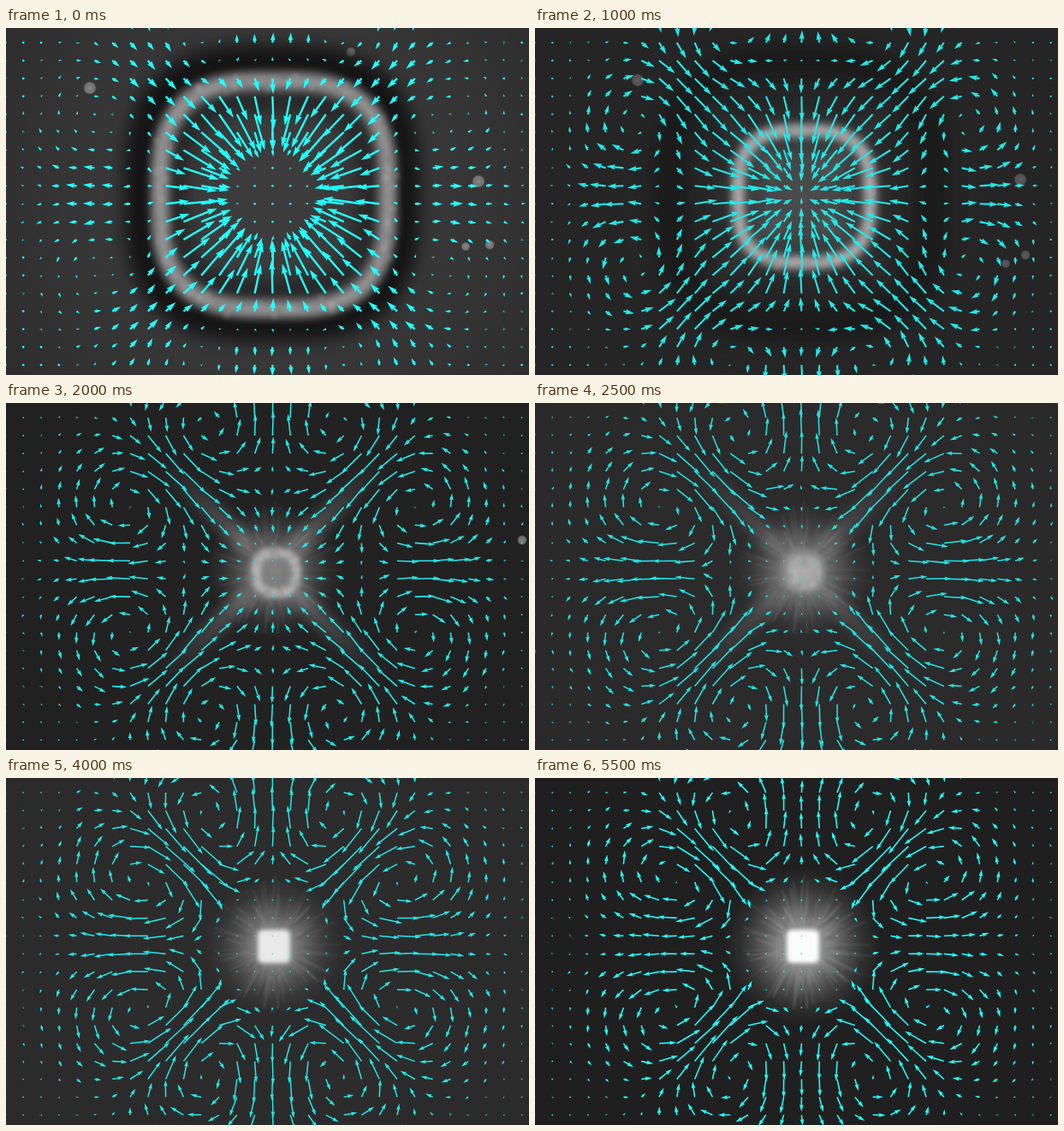
Write an HTML page with a canvas that moves like this. It is 611 px wide and 405 px high and loops after 6 s.

```html
<!DOCTYPE html>
<html lang="en">
<head>
<meta charset="utf-8">
<title>Contracting ring with flow field</title>
<style>
  html, body { margin: 0; width: 100%; height: 100%; overflow: hidden; background: #222; }
  canvas { display: block; width: 611px; height: 405px; }
</style>
</head>
<body>
<canvas id="stage" width="611" height="405"></canvas>
<script>
const W = 611, H = 405, CX = 311, CY = 195;
const STEP = 500, STEPS = 12;
const ctx = document.getElementById('stage').getContext('2d');

// Flow and image settings at a few steps; the rest is interpolated.
const fields = ['step', 'bg', 'pull', 'pullR', 'pullW', 'swirl', 'swirlR', 'swirlW',
  'jet', 'line', 'ring', 'core', 'halo', 'cyan'];
const keys = [
  [0, 60, 45, 105, 27, 3000, 212, 54, .1, 2.4, 133, 0, 0, 255],
  [2, 38, 36, 90, 45, 5200, 210, 38, .1, 2.1, 77, 0, .24, 232],
  [4, 34, 14, 85, 30, 5800, 185, 47, .1, 1.6, 23, .05, .56, 232],
  [6, 52, 0, 85, 30, 6600, 175, 62, .15, 1.5, 4, .8, .62, 222],
  [8, 44, 0, 85, 30, 6000, 170, 55, .28, 1.5, 0, .95, .62, 232],
  [9, 26, 0, 85, 30, 5100, 170, 55, .35, 1.5, 0, .97, .66, 246],
  [11, 32, 0, 85, 30, 5000, 170, 55, .4, 1.6, 0, 1, .75, 250]
];

// x, y, radius, drift per step, first and last step
const spots = [
  [98, 70, 6, 11, -4.5, 0, 3], [552, 179, 6, 7.5, -1, 0, 3],
  [565, 253, 4, 4, 6, 0, 3], [537, 255, 3.5, 6.5, 10, 0, 3],
  [403, 28, 4, 0, 0, 0, 0], [603, 160, 4, 0, 0, 4, 4]
];

const mix = (a, b, t) => a + (b - a) * t;
const gray = (v, a = 1) => `rgba(${v},${v},${v},${a})`;

function random(seed) {
  let s = seed * 7919 + 17;
  return () => (s = (s * 16807) % 2147483647) / 2147483647;
}

function stateAt(step) {
  let i = 0;
  while (i < keys.length - 2 && keys[i + 1][0] <= step) i++;
  const a = keys[i], b = keys[i + 1];
  const t = (step - a[0]) / (b[0] - a[0]);
  return Object.fromEntries(fields.map((name, n) => [name, mix(a[n], b[n], t)]));
}

function blurred(px, paint) {
  ctx.save();
  ctx.filter = `blur(${px}px)`;
  paint();
  ctx.restore();
}

function radial(x, y, r, stops) {
  const g = ctx.createRadialGradient(x, y, 0, x, y, r);
  stops.forEach(([at, color]) => g.addColorStop(at, color));
  ctx.fillStyle = g;
  ctx.fillRect(x - r, y - r, 2 * r, 2 * r);
}

// Distance to a rounded square at a given angle
const squircle = (r, a) => r * (1.06 - .06 * Math.cos(4 * a));

function strokeSquircle(x, y, r, width, color) {
  ctx.beginPath();
  for (let i = 0; i < 120; i++) {
    const a = i / 120 * Math.PI * 2, d = squircle(r, a);
    ctx.lineTo(x + d * Math.cos(a), y + d * Math.sin(a));
  }
  ctx.closePath();
  ctx.lineWidth = width;
  ctx.strokeStyle = color;
  ctx.stroke();
}

// Dark surroundings that the ring leaves behind while it shrinks
function drawShadow(s) {
  const dark = Math.max(0, (s.ring - 25) / 110);
  if (!dark) return;
  blurred(10, () => strokeSquircle(CX, 193, 154, 38, gray(12, .85 * dark)));
  blurred(9, () => strokeSquircle(CX, 195, 110, 24, gray(24, .6 * dark * dark)));
}

function drawRing(s) {
  if (s.ring < 3) return;
  const t = s.ring / 133;
  const x = mix(316, 313, t), y = mix(199, 195, t);
  const level = 150 + (133 - s.ring) * .5;
  const width = 9 + s.ring * .11;
  const show = Math.min(1, s.ring / 20);
  blurred(4, () => strokeSquircle(x, y, s.ring, width, gray(level * .85, .85 * show)));
  blurred(3, () => strokeSquircle(x, y, s.ring, width * .45, gray(level + 15, .6 * show)));

  // uneven brightness along the ring
  const rnd = random(5);
  blurred(2, () => {
    for (let i = 0; i < 150; i++) {
      const a = rnd() * Math.PI * 2;
      const d = squircle(s.ring, a) + (rnd() - .5) * width * .9;
      ctx.fillStyle = gray(rnd() > .5 ? 205 : 90, .2 * show);
      ctx.beginPath();
      ctx.arc(x + d * Math.cos(a), y + d * Math.sin(a), 1 + rnd() * width * .14, 0, 7);
      ctx.fill();
    }
  });
}

function drawArms(step) {
  const show = Math.max(0, 1 - Math.abs(step - 4) / 3.2);
  if (!show) return;
  blurred(7, () => {
    for (const sx of [-1, 1]) for (const sy of [-1, 1]) {
      const ex = CX + sx * 130, ey = CY + sy * 128;
      const g = ctx.createLinearGradient(CX, CY, ex, ey);
      g.addColorStop(0, gray(190, .55 * show));
      g.addColorStop(.6, gray(150, .26 * show));
      g.addColorStop(1, gray(120, 0));
      ctx.strokeStyle = g;
      ctx.lineWidth = 21;
      ctx.beginPath();
      ctx.moveTo(CX + sx * 26, CY + sy * 26);
      ctx.lineTo(ex, ey);
      ctx.stroke();
    }
  });
}

function drawGlow(s, step) {
  const x = 313, y = 196;
  const size = 80 + Math.max(0, 4 - step) * 28 + Math.max(0, step - 8) * 4;
  radial(x, y, size, [
    [0, gray(200, s.halo)], [.32, gray(190, s.halo * .86)],
    [.55, gray(170, s.halo * .5)], [.78, gray(150, s.halo * .18)], [1, gray(140, 0)]
  ]);
  const rnd = random(11);
  const threads = Math.max(0, s.halo - .3);
  blurred(1.2, () => {
    for (let i = 0; i < 120 && threads; i++) {
      const a = rnd() * Math.PI * 2, r = 24 + rnd() * 14;
      const end = r + 12 + rnd() * 36, bend = a + (rnd() - .5) * .25;
      ctx.strokeStyle = gray(rnd() > .35 ? 200 : 40, threads * .36);
      ctx.lineWidth = .8 + rnd() * 1.4;
      ctx.beginPath();
      ctx.moveTo(x + r * Math.cos(a), y + r * Math.sin(a));
      ctx.lineTo(x + end * Math.cos(bend), y + end * Math.sin(bend));
      ctx.stroke();
    }
  });
  blurred(step < 7 ? 6 : 2.5, () => {
    ctx.fillStyle = gray(mix(205, 252, Math.min(1, step / 11)), s.core);
    ctx.beginPath();
    ctx.roundRect(x - 19, y - 19, 38, 39, 6);
    ctx.fill();
  });
}

function drawSpots(step) {
  for (const [x, y, r, dx, dy, first, last] of spots) {
    if (step < first || step > last) continue;
    const t = step - first, show = 1 - t * .2;
    radial(x + dx * t, y + dy * t, r + 2, [
      [0, gray(165, .75 * show)], [.5, gray(130, .8 * show)],
      [.7, gray(150, .7 * show)], [1, gray(120, 0)]
    ]);
  }
}

// Inward pull plus a pattern of eight vortices, turning less while the pull is strong
function flow(x, y, s) {
  const dx = x - CX, dy = y - CY;
  const r = Math.max(1, Math.hypot(dx, dy)), a = Math.atan2(dy, dx);
  const bell = (d, w) => Math.exp(-d * d / (2 * w * w));
  const flux = q => s.swirl * bell(q - s.swirlR, s.swirlW) * (1 - Math.exp(-((q / 90) ** 6)));
  const out = flux(r) / r * (Math.cos(4 * a) - s.jet * Math.cos(8 * a))
    - s.pull * bell(r - s.pullR, s.pullW);
  const turn = -(flux(r + 1) - flux(r - 1)) / 2 * (1 - s.pull * .012)
    * (Math.sin(4 * a) / 4 - s.jet * Math.sin(8 * a) / 8);
  return [out * Math.cos(a) - turn * Math.sin(a), out * Math.sin(a) + turn * Math.cos(a)];
}

function arrow(x, y, vx, vy, line) {
  const len = Math.min(48, Math.hypot(vx, vy));
  if (len < 1.8) {
    ctx.beginPath();
    ctx.arc(x, y, line * .55, 0, 7);
    ctx.fill();
    return;
  }
  const head = Math.min(line * 5, Math.max(len * .8, 4));
  const half = head * .3, neck = len - head * .9, w = line / 2;
  ctx.save();
  ctx.translate(x, y);
  ctx.rotate(Math.atan2(vy, vx));
  ctx.beginPath();
  ctx.moveTo(0, -w);
  ctx.lineTo(neck, -w);
  ctx.lineTo(len - head, -half);
  ctx.lineTo(len, 0);
  ctx.lineTo(len - head, half);
  ctx.lineTo(neck, w);
  ctx.lineTo(0, w);
  ctx.fill();
  ctx.restore();
}

function drawFlow(s, step) {
  const rnd = random(step + 3);
  ctx.fillStyle = `rgb(34,${s.cyan},${s.cyan})`;
  for (let row = 0; row < 21; row++) {
    for (let col = 0; col < 30; col++) {
      const x = -.6 + col * 20.8, y = -3.8 + row * 20.9;
      const [vx, vy] = flow(x, y, s);
      const near = Math.hypot(x - CX, y - CY) < 50 ? .4 : 1;
      const gain = .92 + rnd() * .16;
      arrow(x, y, vx * gain + (rnd() - .5) * 3 * near, vy * gain + (rnd() - .5) * 3 * near, s.line);
    }
  }
}

function draw(step) {
  const s = stateAt(step);
  ctx.fillStyle = gray(s.bg);
  ctx.fillRect(0, 0, W, H);
  const shade = ctx.createRadialGradient(CX, CY, 130, CX, CY, 370);
  shade.addColorStop(0, gray(0, 0));
  shade.addColorStop(1, gray(0, step < 2 ? .25 : .04));
  ctx.fillStyle = shade;
  ctx.fillRect(0, 0, W, H);
  drawSpots(step);
  drawShadow(s);
  drawArms(step);
  drawGlow(s, step);
  drawRing(s);
  drawFlow(s, step);
}

const start = performance.now();
let shown = -1;
function tick() {
  const step = Math.floor((performance.now() - start) / STEP) % STEPS;
  if (step !== shown) draw(shown = step);
  requestAnimationFrame(tick);
}
tick();
</script>
</body>
</html>
```
